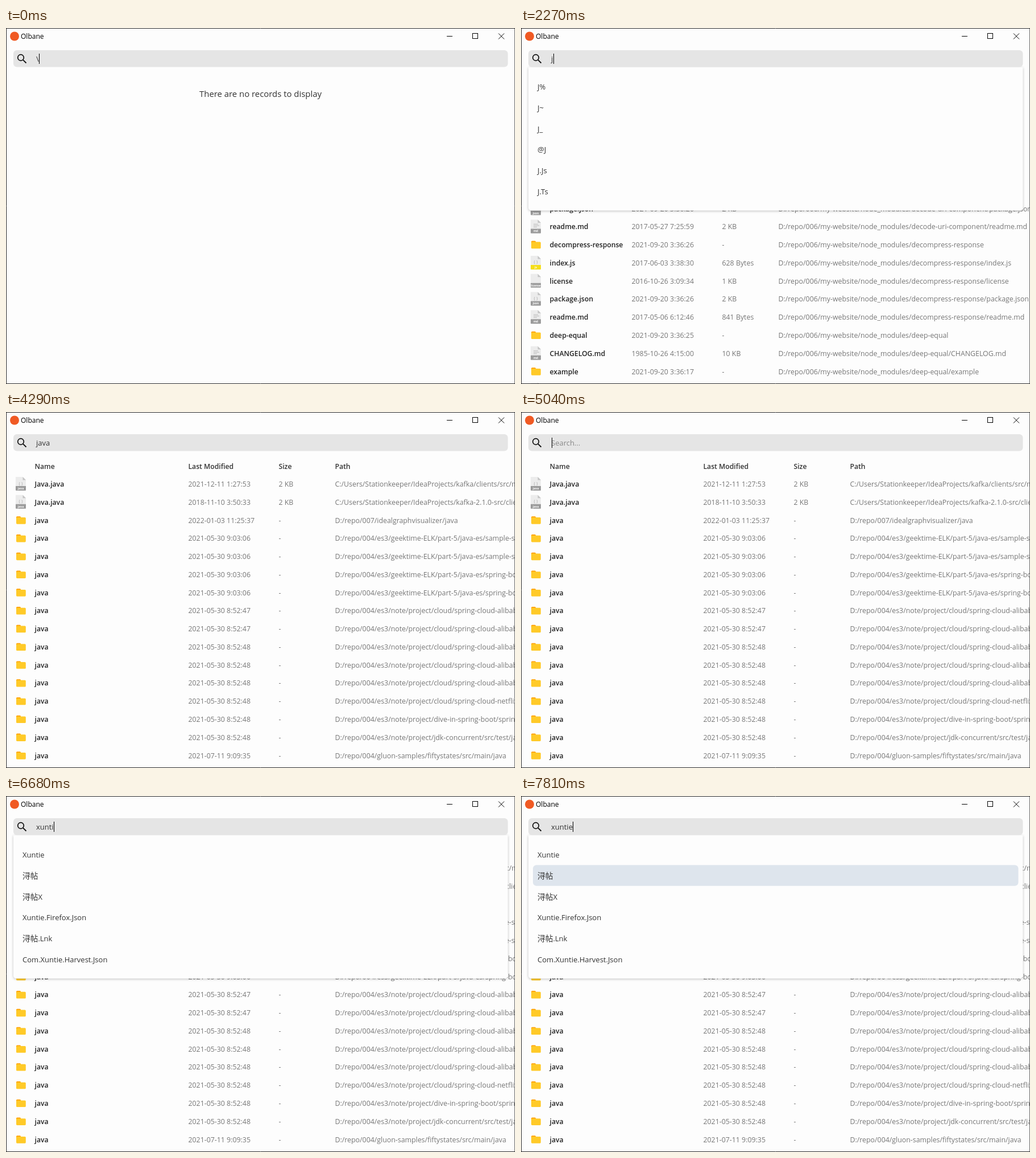
Write an HTML page with a canvas that moves like this. It is 895 by 625 pixels and loops after 8000 ms.

```html
<!DOCTYPE html>
<html lang="en">
<head>
<meta charset="utf-8">
<title>File search</title>
<style>
html, body { margin: 0; width: 100%; height: 100%; overflow: hidden; background: #fdfdfd; }
canvas { display: block; width: 895px; height: 625px; }
</style>
</head>
<body>
<canvas id="stage" width="895" height="625"></canvas>
<script>
const W = 895, H = 625, LOOP = 8000;
const ctx = document.getElementById('stage').getContext('2d');
const SANS = '"Open Sans", "Noto Sans", "DejaVu Sans", sans-serif';
const CJK = '"Noto Sans CJK SC", "Noto Sans CJK", sans-serif';
const PAGE = '#fdfdfd';
const ROW = 31.77;

const modules = 'D:/repo/006/my-website/node_modules/';
const es3 = 'D:/repo/004/es3/';
const elk = es3 + 'geektime-ELK/part-5/java-es/';
const cloud = es3 + 'note/project/cloud/spring-cloud-';
const idea = 'C:/Users/Stationkeeper/IdeaProjects/';

// Each row: path | modified | size
const tables = [null, {
  cols: [50.5, 194.5, 353.5, 452.5],
  rows: [
    'debug/src|2021-09-20 3:36:18|-',
    'decamelize/package.json|2021-09-20 3:36:26|2 KB',
    'decamelize/readme.md|2016-03-05 4:48:07|781 Bytes',
    'decode-uri-component|2021-09-20 3:36:26|-',
    'decode-uri-component/index.js|2017-06-29 2:09:16|2 KB',
    'decode-uri-component/license|2017-05-20 4:30:41|1 KB',
    'decode-uri-component/package.json|2021-09-20 3:36:26|2 KB',
    'decode-uri-component/readme.md|2017-05-27 7:25:59|2 KB',
    'decompress-response|2021-09-20 3:36:26|-',
    'decompress-response/index.js|2017-06-03 3:38:30|628 Bytes',
    'decompress-response/license|2016-10-26 3:09:34|1 KB',
    'decompress-response/package.json|2021-09-20 3:36:26|2 KB',
    'decompress-response/readme.md|2017-05-06 6:12:46|841 Bytes',
    'deep-equal|2021-09-20 3:36:25|-',
    'deep-equal/CHANGELOG.md|1985-10-26 4:15:00|10 KB',
    'deep-equal/example|2021-09-20 3:36:17|-',
    'deep-equal/index.js|1985-10-26 4:15:00|3 KB'
  ].map(r => parse(modules + r))
}, {
  cols: [50.5, 320.5, 479.5, 578.5],
  rows: [
    idea + 'kafka/clients/src/main/Java.java|2021-12-11 1:27:53|2 KB',
    idea + 'kafka-2.1.0-src/clients/src/Java.java|2018-11-10 3:50:33|2 KB',
    'D:/repo/007/idealgraphvisualizer/java|2022-01-03 11:25:37|-',
    elk + 'sample-server/src/main/java|2021-05-30 9:03:06|-',
    elk + 'sample-server/src/test/java|2021-05-30 9:03:06|-',
    elk + 'spring-boot/src/main/java|2021-05-30 9:03:06|-',
    elk + 'spring-boot/src/test/java|2021-05-30 9:03:06|-',
    ...[47, 47, 48, 48, 48].map(s => cloud + 'alibaba/src/main/java|2021-05-30 8:52:' + s + '|-'),
    cloud + 'netflix/src/main/java|2021-05-30 8:52:48|-',
    es3 + 'note/project/dive-in-spring-boot/spring/java|2021-05-30 8:52:48|-',
    es3 + 'note/project/jdk-concurrent/src/test/java|2021-05-30 8:52:48|-',
    'D:/repo/004/gluon-samples/fiftystates/src/main/java|2021-07-11 9:09:35|-'
  ].map(parse)
}];

const menus = {
  j: 'J%|J~|J_|@J|J.Js|J.Ts',
  ja: 'Ja|Ja_|@Ja|Ja.Js|Ja.Ts|Ja.Md',
  jav: 'Jav|Java|Java_|Java.Js|Java.Md|Javac.Exe',
  java: 'Java|Java_|Java.Java|Java.Js|Java.Md|Java.Exe',
  x: 'X%|X~|X_|@X|X.Js|X.Ts',
  xu: 'Xu|Xu_|@Xu|Xu.Js|Xu.Ts|Xu.Md',
  xun: '柏岑舟-灯影雾中寻.Mp3|绒绒荨-可爱女头鸭♡|绒绒荨：可爱女头鸭♡|绒绒荨：阔爱女头鸭♡|供应商品进货旬、月报表.Ewd|情头：提一盏灯笼，迎着风雨寻你。',
  xunt: 'Xuntie|浔帖|浔帖X|Xuntie.Firefox.Json|浔帖.Lnk|Com.Xuntie.Harvest.Json'
};

// start, query, caret, menu, table, highlighted item
const steps = [
  [0, '\\', 1, '', 0], [380, '', 1, '', 0], [500, '', 1, '', 0], [880, '', 0, '', 0],
  [1130, '', 0, '', 1], [1390, '', 1, '', 1], [1890, '', 0, '', 1],
  [2270, 'j', 1, 'j', 1], [2400, 'ja', 1, 'ja', 1], [2520, 'jav', 1, 'jav', 1],
  [2650, 'java', 1, 'java', 1], [3150, 'java', 0, 'java', 1],
  [3280, 'java', 0, '', 1], [3410, 'java', 0, '', 2], [3660, 'java', 1, '', 2], [4290, 'java', 0, '', 2],
  [4540, 'jav', 1, 'jav', 2], [4670, 'ja', 1, 'ja', 2], [4790, 'j', 1, 'j', 2],
  [4920, '', 1, 'j', 2], [5040, '', 1, '', 2],
  [5300, 'x', 1, 'x', 2], [5420, 'xu', 1, 'x', 2], [5550, 'xu', 1, 'xu', 2],
  [5680, 'xun', 1, 'xu', 2], [5800, 'xun', 1, 'xun', 2],
  [6050, 'xunt', 1, 'xunt', 2], [6680, 'xunti', 1, 'xunt', 2], [6810, 'xuntie', 1, 'xunt', 2],
  [7310, 'xuntie', 0, 'xunt', 2], [7690, 'xuntie', 0, 'xunt', 2, 0], [7810, 'xuntie', 1, 'xunt', 2, 1]
];

function parse(line) {
  const [path, date, size] = line.split('|');
  const name = path.split('/').pop();
  const ext = name === 'license' ? name : name.includes('.') ? name.split('.').pop() : '';
  return { path, date, size, name, ext };
}

function text(s, x, y, size, color, weight = 400, align = 'left') {
  ctx.font = `${weight} ${size}px ${SANS}`;
  ctx.fillStyle = color;
  ctx.textAlign = align;
  ctx.fillText(s, x, y);
}

// Draws Latin and Chinese runs in their own fonts
function mixed(s, x, y) {
  ctx.textAlign = 'left';
  ctx.fillStyle = '#333';
  for (const run of s.split(/([\u3000-\u9fff\uff00-\uffef]+)/)) {
    ctx.font = /[\u3000-\u9fff\uff00-\uffef]/.test(run) ? `13.7px ${CJK}` : `13px ${SANS}`;
    ctx.fillText(run, x, y);
    x += ctx.measureText(run).width;
  }
}

function line(color, width, ...pts) {
  ctx.strokeStyle = color;
  ctx.lineWidth = width;
  ctx.beginPath();
  for (let i = 0; i < pts.length; i += 4) {
    ctx.moveTo(pts[i], pts[i + 1]);
    ctx.lineTo(pts[i + 2], pts[i + 3]);
  }
  ctx.stroke();
}

function shape(color, ...pts) {
  ctx.fillStyle = color;
  ctx.beginPath();
  for (let i = 0; i < pts.length; i += 2) ctx.lineTo(pts[i], pts[i + 1]);
  ctx.fill();
}

function round(fill, x, y, w, h, r) {
  ctx.fillStyle = fill;
  ctx.beginPath();
  ctx.roundRect(x, y, w, h, r);
  ctx.fill();
}

function titleBar() {
  ctx.fillStyle = '#f05a24';
  ctx.beginPath();
  ctx.arc(15, 14.5, 8, 0, 7);
  ctx.fill();
  text('Olbane', 26, 19, 12, '#000');
  line('#000', 1, 775, 14.5, 785, 14.5);
  ctx.strokeRect(820.5, 9.5, 9, 9);
  line('#000', 1, 866, 9.5, 876, 19.5, 876, 9.5, 866, 19.5);
}

function searchBar(query, caret, hint) {
  round('#e5e5e5', 13, 39, 869.5, 29.5, 6);
  ctx.strokeStyle = '#111';
  ctx.lineWidth = 1.7;
  ctx.beginPath();
  ctx.arc(26, 52, 5.3, 0, 7);
  ctx.stroke();
  line('#111', 1.8, 29.8, 55.8, 35.5, 61.5);
  if (hint) text('Search...', 53, 59, 13, '#888');
  text(query, 53, 59, 13, '#333');
  if (caret) {
    ctx.fillStyle = '#000';
    ctx.fillRect(Math.floor(53 + ctx.measureText(query).width) + 1, 45, 1, 18);
  }
}

function folder(y) {
  const top = y - 6.8;
  round('#ffa000', 18, top, 8, 6, 1.6);
  shape('#ffa000', 24.4, top + 0.2, 26, top + 1.8, 24.4, top + 1.8);
  round('#ffca28', 18, top + 1.7, 16.8, 11.7, 1.6);
}

function fileIcon(ext, y) {
  const top = y - 12.5;
  shape('#ececec', 17, top, 29.5, top, 35, top + 5.5, 35, top + 17, 17, top + 17);
  shape('#c4c4c4', 29.5, top, 35, top + 5.5, 29.5, top + 5.5);
  round(ext === 'js' ? '#f5de19' : '#9b9b9b', 17, top + 16, 18, 8, [0, 0, 1, 1]);
  text(ext, 26, top + 22, 5, '#fff', 700, 'center');
  if (ext === 'md') {
    line('#bbb', 1, 22, y - 4.5, 30, y - 4.5, 22, y - 2, 32, y - 2, 22, y + 0.5, 28, y + 0.5);
  } else if (ext !== 'license') {
    text('( )', 26, y + 1, 8, '#aaa', 400, 'center');
  }
}

function drawTable({ cols, rows }) {
  ['Name', 'Last Modified', 'Size', 'Path'].forEach((s, i) => text(s, cols[i], 100, 12.2, '#333', 600));
  rows.forEach((r, i) => {
    const y = 126.5 + i * ROW, base = Math.round(y + 4.5);
    if (r.ext) fileIcon(r.ext, y); else folder(y);
    text(r.name, cols[0], base, 12.2, '#222', 600);
    [r.date, r.size, r.path].forEach((s, k) => text(s, cols[k + 1], base, 12.35, '#777'));
  });
}

function drawMenu(items, active) {
  ctx.save();
  ctx.shadowColor = 'rgba(0,0,0,.25)';
  ctx.shadowBlur = 4;
  ctx.shadowOffsetY = 1;
  round(PAGE, 13, 69, 869.5, 251.5, [0, 0, 5, 5]);
  ctx.restore();
  items.split('|').forEach((s, i) => {
    const y = 103 + i * 36.75;
    if (i === active) round('#dee5ed', 21, y - 18.5, 853.5, 36.5, 6);
    mixed(s, 29, Math.round(y + 5));
  });
}

function border() {
  line('#2a2a2a', 1, 0, 0.5, W, 0.5, 0.5, 0, 0.5, H, 0, H - 0.5, W, H - 0.5);
  line('rgba(42,42,42,.7)', 1, W - 0.5, 0, W - 0.5, H);
}

function draw(t) {
  const [start, query, caret, menu, table, active] = steps.findLast(s => s[0] <= t);
  ctx.fillStyle = PAGE;
  ctx.fillRect(0, 0, W, H);
  titleBar();
  if (table) drawTable(tables[table]);
  else text('There are no records to display', 447.5, 121, 14.9, '#333', 400, 'center');
  if (menu) drawMenu(menus[menu], active);
  searchBar(query, caret, !query && start >= 500);
  border();
}

const begin = performance.now();
function tick() {
  draw((performance.now() - begin) % LOOP);
  requestAnimationFrame(tick);
}
tick();
</script>
</body>
</html>
```
